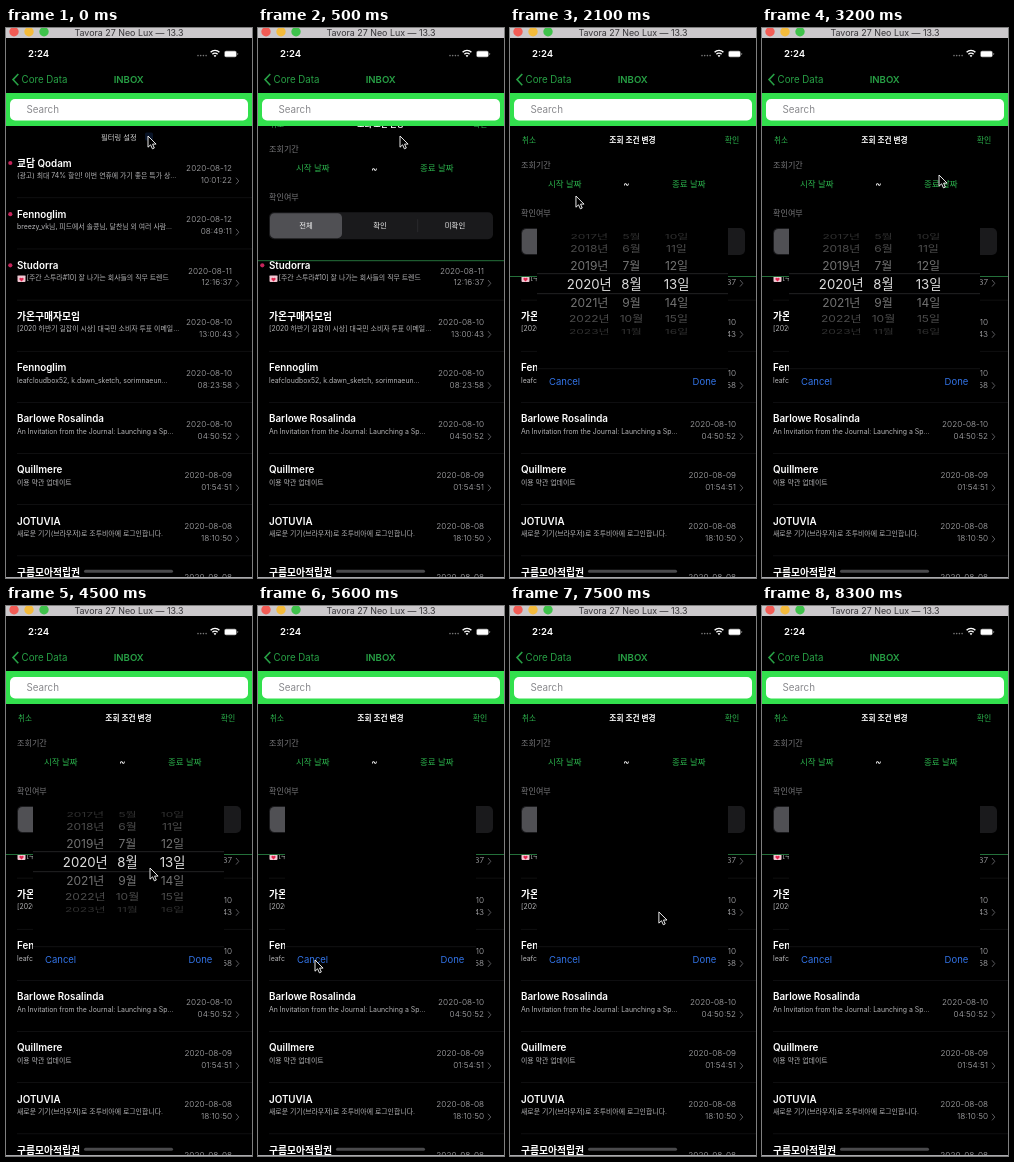
An HTML page for the animation above (8.9 s loop, 246 by 550 pixels).

```html
<!DOCTYPE html>
<html lang="ko">
<head>
<meta charset="utf-8">
<style>
html, body { margin: 0; height: 100%; overflow: hidden; background: #000; }
svg { display: block; width: 100vw; height: 100vh; }
text { font-family: Inter, "Noto Sans CJK KR", "Noto Sans CJK", sans-serif; white-space: pre; }
</style>
</head>
<body>
<svg id="stage" viewBox="0 0 246 550"></svg>
<script>
const LOOP = 8900, STEP = 100;
const GREEN = '#2bb24c', NAV = '#27a045';
const stage = document.getElementById('stage');

// Text centred vertically on y
const text = (str, x, y, size, fill, more = '') =>
  `<text x="${x}" y="${y + size * .36}" font-size="${size}" fill="${fill}" ${more}>${str}</text>`;
const rect = (x, y, w, h, fill, r = 0) =>
  `<rect x="${x}" y="${y}" width="${w}" height="${h}" rx="${r}" fill="${fill}"/>`;
const dot = (x, y, r, fill) => `<circle cx="${x}" cy="${y}" r="${r}" fill="${fill}"/>`;
const line = (d, stroke, width) =>
  `<path d="${d}" fill="none" stroke="${stroke}" stroke-width="${width}"/>`;
const MID = 'text-anchor="middle"', END = 'text-anchor="end"';
const BOLD = 'font-weight="600"', LIGHT = 'font-weight="300"';

const mails = [
  ['쿄담 Qodam', '(광고) 최대 74% 할인! 이번 연휴에 가기 좋은 특가 상…', '2020-08-12', '10:01:22'],
  ['Fennoglim', 'breezy_vk님, 피드에서 솔콩님, 달찬님 외 여러 사람…', '2020-08-12', '08:49:11'],
  ['Studorra', '[주간 스투라#10] 잘 나가는 회사들의 직무 트렌드', '2020-08-11', '12:16:37'],
  ['가온구매자모임', '[2020 하반기 길잡이 시상] 대국민 소비자 투표 이메일…', '2020-08-10', '13:00:43'],
  ['Fennoglim', 'leafcloudbox52, k.dawn_sketch, sorimnaeun…', '2020-08-10', '08:23:58'],
  ['Barlowe Rosalinda', 'An Invitation from the Journal: Launching a Sp…', '2020-08-10', '04:50:52'],
  ['Quillmere', '이용 약관 업데이트', '2020-08-09', '01:54:51'],
  ['JOTUVIA', '새로운 기기(브라우저)로 조투비아에 로그인합니다.', '2020-08-08', '18:10:50'],
  ['구름모아적립권', '', '2020-08-08', '']
];

const letter = rect(11.5, 247.5, 8, 6.5, '#f3c6d2', 1) +
  line('M11.5 248L15.5 251L19.5 248', '#d8d0d4', .6) +
  '<path d="M15.5 253.6l-2-2.1a1.1 1.1 0 0 1 2-1.2a1.1 1.1 0 0 1 2 1.2z" fill="#e0264f"/>';

function mailRow([name, note, day, time], i) {
  const y = 135 + i * 51.15;
  return text(name, 11, y, 9.8, '#fff', BOLD) +
    text(note, i === 2 ? 20.5 : 11, y + 12.5, 6.9, '#b6b6b8') +
    text(day, 226, y + 5.3, 8.2, '#b2b2b5', `${END} ${LIGHT}`) +
    text(time, 226, y + 17.2, 8.2, '#b2b2b5', `${END} ${LIGHT}`) +
    (time && line(`M230 ${y + 14.7}l2.8 3.3l-2.8 3.3`, '#5a5a5e', 1)) +
    rect(11, y + 34.5, 235, .6, '#19191b') +
    (i < 3 ? dot(4.3, y, 2.1, '#c5245a') : '') + (i === 2 ? letter : '');
}

const list = mails.map(mailRow).join('') +
  text('필터링 설정', 95, 109, 7.3, '#d0d0d0') +
  rect(139, 104.5, 8, 8, '#081326', 1.5);

const panel = rect(0, 98, 246, 150, '#000') + rect(0, 248, 246, 1, '#24703a') +
  text('취소', 12, 112, 7.6, GREEN) +
  text('조회 조건 변경', 122.5, 112, 7.7, '#fff', `${MID} ${BOLD}`) +
  text('확인', 229.3, 112, 7.9, GREEN, END) +
  text('조회기간', 11, 137, 8.1, '#77777a') +
  `<g id="from">${text('시작 날짜', 38, 156, 8.5, GREEN)}</g>` +
  text('~', 116.5, 156, 9.5, '#fff', MID) +
  text('종료 날짜', 162, 156, 8.5, GREEN) +
  text('확인여부', 11, 185, 8.1, '#77777a') +
  rect(11, 200, 224, 27, '#1a1a1c', 5) + rect(12, 201, 72, 25, '#505054', 4.5) +
  rect(159.5, 207, .6, 13, '#333336') +
  [['전체', 48], ['확인', 122], ['미확인', 197]]
    .map(([s, x]) => text(s, x, 213.5, 7.4, '#f2f2f2', MID)).join('');

const wifi = line('M204.6 24.3a6 6 0 0 1 8.8 0', '#fff', 1.4) +
  line('M206.4 26.2a3.6 3.6 0 0 1 5.2 0', '#fff', 1.4) +
  '<path d="M207.6 27.6a2 2 0 0 1 2.8 0l-1.4 1.6z" fill="#fff"/>';
const battery = rect(218.3, 22.8, 12.4, 6.4, '#999', 1.9) +
  rect(219, 23.4, 11, 5.2, '#fff', 1.2) + rect(231.2, 25, .9, 2, '#888', .4);

const header = rect(0, 0, 246, 65, '#000') + rect(0, 0, 246, 10, '#cbc8cb') +
  dot(8, 3.8, 4.7, '#f25c55') + dot(23, 3.8, 4.7, '#f4bb3c') + dot(38, 3.8, 4.7, '#3fc24b') +
  text('Tavora 27 Neo Lux — 13.3', 123, 4.8, 8.9, '#353337', MID) +
  text('2:24', 22, 26, 9.6, '#fff', BOLD) +
  [192, 194.7, 197.4, 200.1].map(x => dot(x, 27.6, .8, '#777')).join('') + wifi + battery +
  line('M12.3 46l-5.3 5.6l5.3 5.6', NAV, 1.6) +
  text('Core Data', 15.6, 51.5, 9.7, NAV) +
  text('INBOX', 122.7, 51.5, 9.6, NAV, `${MID} ${BOLD}`) +
  rect(0, 65, 246, 33, '#32e04d') + rect(4, 71, 238, 21.5, '#fff', 5) +
  text('Search', 20.5, 81.7, 9.8, '#8a8a8e');

function wheelRow(d) {
  const a = d * 19 * Math.PI / 180, size = d ? 12 : 13.2;
  const fill = ['#dedede', '#747474', '#4c4c4c', '#303030'][Math.abs(d)];
  const cells = [[2020 + d + '년', 79.3], [8 + d + '월', 121.5], [13 + d + '일', 166.5]];
  return `<g transform="translate(0 ${256 + 57 * Math.sin(a)}) scale(1 ${Math.cos(a)})">` +
    cells.map(([s, x]) => text(s, x, 0, size, fill, MID)).join('') + '</g>';
}

const wheel = [-3, -2, -1, 0, 1, 2, 3].map(wheelRow).join('') +
  rect(27, 245.5, 191, .6, '#38383a') + rect(27, 265.5, 191, .6, '#38383a');

const dialog = rect(27, 192, 191, 178, '#000', 3) + `<g id="wheel">${wheel}</g>` +
  rect(27, 340.5, 191, .6, '#1d1d1f') +
  text('Cancel', 39, 353.5, 9.5, '#3273e6') + text('Done', 206.3, 353.5, 9.5, '#3273e6', END);

stage.innerHTML = rect(0, 0, 246, 550, '#000') + list +
  `<g id="panel">${panel}</g>` + header + `<g id="dialog">${dialog}</g>` +
  rect(78, 541.8, 89, 3, '#4a4a4c', 1.5) + rect(0, 549, 246, 1, '#a9a9ad') +
  `<path id="cursor" d="M0 0V11.2L2.6 8.8L4.4 12.8L6.3 12L4.6 8.1H8.1Z"
    fill="#000" stroke="#fff" stroke-width=".9"/>`;

const [from, panelG, dialogG, wheelG, cursor] =
  ['from', 'panel', 'dialog', 'wheel', 'cursor'].map(id => document.getElementById(id));

// Pointer stops: time, x, y
const stops = [
  [0, 142, 108], [500, 142, 108], [1000, 57, 157], [2000, 57, 157],
  [2500, 143, 263], [2700, 143, 263], [3200, 177, 147], [3400, 177, 147],
  [3800, 144, 262], [4700, 144, 262], [5000, 57, 354], [5800, 57, 354],
  [6200, 8, 380], [6800, 160, 171], [7100, 226, 205], [7400, 180, 308],
  [7700, 60, 300], [8100, 192, 24], [LOOP, 192, 24]
];

const ramp = (t, a, b) => {
  const k = Math.min(1, Math.max(0, (t - a) / (b - a)));
  return k * k * (3 - 2 * k);
};

function pointer(t) {
  const i = stops.findIndex(s => s[0] > t);
  const [a, x0, y0] = stops[i - 1], [b, x1, y1] = stops[i];
  const k = ramp(t, a, b);
  return [x0 + (x1 - x0) * k, y0 + (y1 - y0) * k];
}

function draw(now) {
  const t = Math.floor(now % LOOP / STEP) * STEP;
  panelG.setAttribute('transform', `translate(0 ${-152 * (1 - ramp(t, 100, 600))})`);
  from.setAttribute('opacity', t >= 1000 && t < 1600 ? .35 : 1);
  dialogG.setAttribute('opacity', ramp(t, 1400, 1900));
  wheelG.setAttribute('opacity', 1 - ramp(t, 5200, 5600));
  cursor.setAttribute('transform', `translate(${pointer(t)})`);
  cursor.setAttribute('visibility', t < 8300 ? 'visible' : 'hidden');
}

const start = performance.now();
function tick() {
  draw(performance.now() - start);
  requestAnimationFrame(tick);
}
tick();
</script>
</body>
</html>
```
